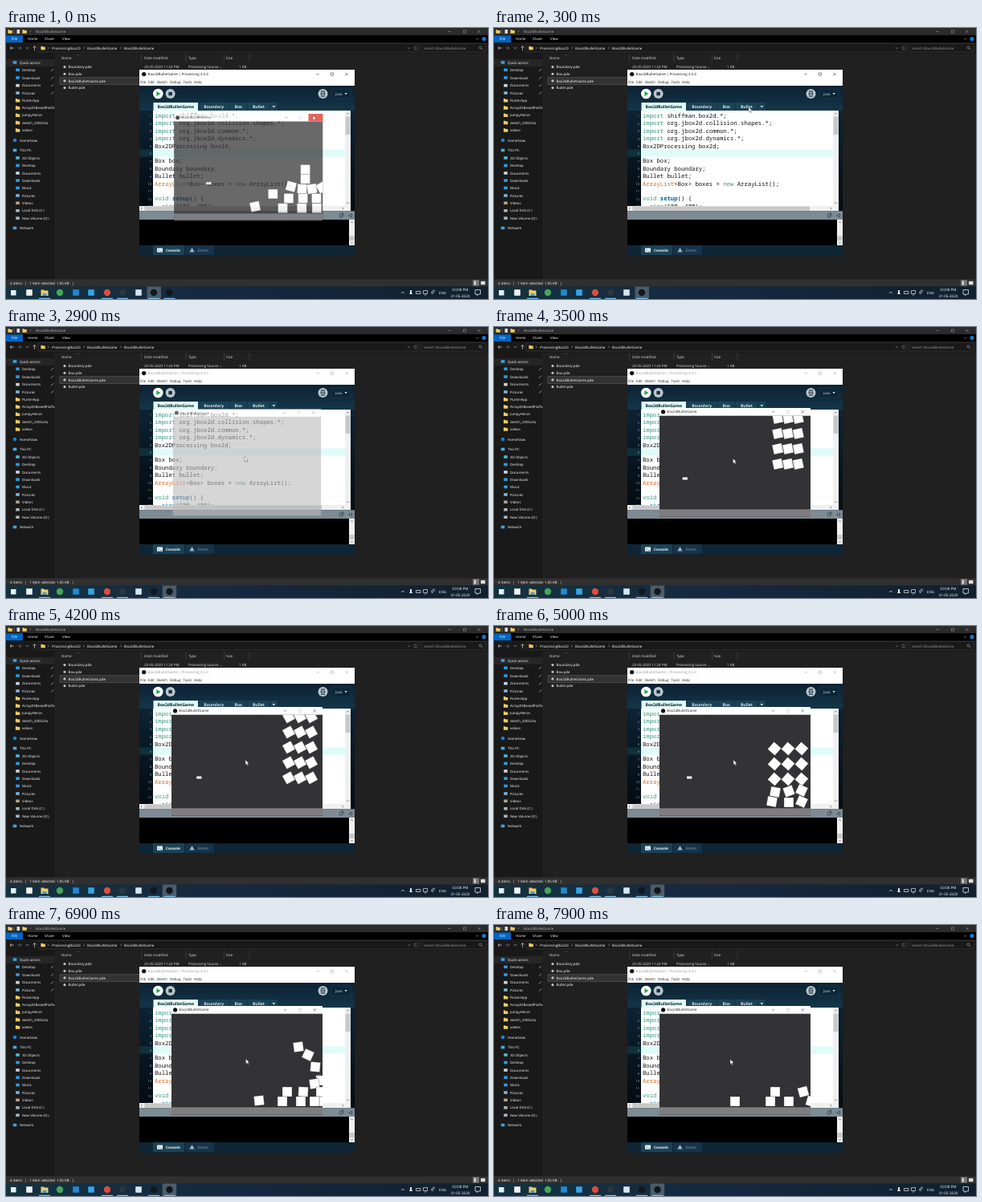
These frames come from a looping animation (600x338 px, 8000 ms). An HTML page:

```html
<!DOCTYPE html>
<html lang="en">
<head>
<meta charset="utf-8">
<title>Box2dBulletGame</title>
<style>
  html, body { margin: 0; width: 100%; height: 100%; overflow: hidden; background: #000; }
  svg { display: block; width: 600px; height: 338px; }
  text { font-family: "Open Sans", "Noto Sans", sans-serif; white-space: pre; text-rendering: geometricPrecision; }
  .code { font-family: "Noto Sans Mono", "DejaVu Sans Mono", monospace; }
</style>
</head>
<body>
<svg id="stage" viewBox="0 0 600 338"></svg>
<script>
const stage = document.getElementById('stage');

// Markup helpers; text is placed by its vertical middle.
const rect = (x, y, w, h, fill, more = '') => `<rect x="${x}" y="${y}" width="${w}" height="${h}" fill="${fill}" ${more}/>`;
const disc = (x, y, r, fill, more = '') => `<circle cx="${x}" cy="${y}" r="${r}" fill="${fill}" ${more}/>`;
const shape = (d, fill, more = '') => `<path d="${d}" fill="${fill}" ${more}/>`;
const line = (d, color, width = .5) => shape(d, 'none', `stroke="${color}" stroke-width="${width}"`);
const text = (x, y, str, fill = '#fff', size = 4.45, more = '') =>
  `<text x="${x}" y="${y + size * .36}" fill="${fill}" font-size="${size}" ${more}>${str}</text>`;
const folder = (x, y) => shape(`M${x - 2.6} ${y - 2.2}h2l.8 .8h2.6v3.6h-5.4z`, '#f3cb62');
const controls = (xs, y, color, faint = color) =>
  line(`M${xs[0] - 1.8} ${y}h3.6`, color) +
  line(`M${xs[1] - 1.6} ${y - 1.6}h3.2v3.2h-3.2z`, faint) +
  line(`M${xs[2] - 1.7} ${y - 1.7}l3.4 3.4m0 -3.4l-3.4 3.4`, color);

function explorer() {
  let out = rect(0, 0, 600, 338, '#202020') + rect(0, 0, 600, 9, '#2b2b2b') + rect(0, 9, 600, 9, '#000') +
    rect(0, 18, 600, 14, '#191919') + rect(0, 32, 61, 281, '#191919') + rect(0, 9.3, 21, 8.7, '#0066c4') +
    rect(0, 39, 60, 9, '#262626') +
    folder(5, 4.5) + rect(13.5, 2, 3.6, 5, '#ddd') + folder(23, 4.5) + line('M10 2v5M29.5 4h2', '#aaa') +
    text(37, 4.5, 'Box2dBulletGame', '#b4b4b4') + controls([552, 571, 589], 4.5, '#aaa') +
    disc(595, 13.5, 2.6, '#1a78c8') + line('M585 12.8l1.6 1.6 1.6-1.6', '#ccc') +
    text(10.5, 13.5, 'File', '#fff', 4.5, 'text-anchor="middle"') +
    text(27, 13.5, 'Home') + text(48, 13.5, 'Share') + text(70, 13.5, 'View');

  out += rect(40, 19.5, 474, 10.5, '#191919', 'stroke="#444" stroke-width=".5"') +
    rect(517, 19.5, 80, 10.5, '#191919', 'stroke="#444" stroke-width=".5"') +
    line('M10 25h-5m2-2l-2 2 2 2M25 24.2l1.5 1.5 1.5-1.5M35.5 28v-5.5m-2 2l2-2 2 2', '#eee', .6) +
    line('M14 25h5m-2-2l2 2-2 2', '#888', .6) + folder(46, 25) +
    ['ProcessingBox2D', 'Box2dBulletGame', 'Box2dBulletGame'].map((name, i) =>
      text([57, 101, 147][i], 25, name) + line(`M${[52, 96.5, 142.5][i]} 23.6l1.4 1.4-1.4 1.4`, '#bbb')).join('') +
    line('M500 24.2l1.5 1.5 1.5-1.5M511.5 23.8a1.9 1.9 0 1 0 .3 1.8', '#bbb') +
    text(520, 25, 'Search Box2dBulletGame', '#9a9a9a') +
    line('M592 24.3a1.5 1.5 0 1 0-3 0 1.5 1.5 0 1 0 3 0m-.5 1l2 2', '#bbb');

  const places = [
    [43, 'Quick access', '#35a0e8'], [52.3, 'Desktop', '#2f9be0'], [62, 'Downloads', '#2f9be0'],
    [71.7, 'Documents', '#cdd3d8'], [81, 'Pictures', '#7fb4d8'], [90.3, 'FlutterApp'], [99.5, 'Array2DBasedPlatfo'],
    [108.8, 'JumpyHeron'], [118, 'sketch_200523a'], [127.5, 'videos'], [140, 'HomeStow', '#1687d9'],
    [152.5, 'This PC', '#4aa8e0'], [162, '3D Objects', '#4fb8d8'], [171.5, 'Desktop', '#2f9be0'],
    [181, 'Documents', '#cdd3d8'], [190.2, 'Downloads', '#2f9be0'], [199.5, 'Music', '#2f9be0'],
    [209, 'Pictures', '#7fb4d8'], [218.3, 'Videos', '#b8a58a'], [227.8, 'Local Disk (C:)', '#a8b4bc'],
    [237.2, 'New Volume (D:)', '#a8b4bc'], [249.5, 'Network', '#3f9fe0']];
  places.forEach(([y, name, color], i) => {
    const root = [0, 10, 11, 21].includes(i), x = root ? 11 : 14.5;
    out += color ? (i == 10 ? disc(x, y, 2.2, color) : rect(x - 2.3, y - 1.8, 4.6, 3.6, color)) : folder(x, y);
    out += text(root ? 17 : 20, y, name, '#fff', 4.35);
    if (i > 0 && i < 5) out += line(`M56 ${y + 1.6}l3-3`, '#bbb', .8);
  });

  out += line('M61.3 32V313', '#2c2c2c') + line('M168.5 32v10M224 32v10M271.5 32v10M303 32v10', '#555') +
    line('M88 34l1.5-1 1.5 1', '#888', .4) + rect(67, 61.8, 240, 8.6, '#333', 'stroke="#666" stroke-width=".5"') +
    text(69, 37, 'Name', '#ddd') + text(172, 37, 'Date modified', '#ddd') +
    text(227, 37, 'Type', '#ddd') + text(274, 37, 'Size', '#ddd') +
    ['Boundary.pde', 'Box.pde', 'Box2dBulletGame.pde', 'Bullet.pde'].map((name, i) => {
      const y = 48.6 + i * 8.65;
      return disc(73, y, 1.6, '#b9c2c8') + text(77.5, y, name);
    }).join('') +
    text(172, 48.6, '25-05-2020 11:24 PM', '#ddd') + text(227, 48.6, 'Processing Source ...', '#ddd') +
    text(290, 48.6, '1 KB', '#ddd') + rect(0, 313.5, 600, 9, '#303030') +
    text(5, 318, '4 items   |   1 item selected  1.05 KB   |') +
    rect(581, 314.3, 8, 7.4, '#777') + rect(583, 315.5, 1.5, 5, '#fff') + rect(591, 315.8, 5.5, 4.4, '#ddd');
  return out;
}

function taskbar() {
  const icons = [
    [29, '#f0f0f0', 0], [67, '#46a758', 1], [87, '#2189d1', 0], [106, '#35a4e6', 0], [126, '#dd4b3e', 1],
    [145, '#2b3740', 1], [165, '#d5e6f0', 0], [184, '#11181d', 1]];
  return rect(0, 322.5, 600, 15.5, 'url(#dock)') +
    rect(0, 322.5, 17.5, 15.5, '#4a5c69', 'id="active"') + rect(6, 327, 6.5, 6.5, '#e4f1f9') +
    icons.map(([x, color, round]) => round ? disc(x, 330, 4.2, color) : rect(x - 3.8, 326.2, 7.6, 7.6, color)).join('') +
    shape('M43.5 326.5h3.5l1 1h4.5v6.5h-9z', '#f5cb60') + rect(45.5, 331, 5, 3, '#3d9be0') +
    [41, 119, 138, 177].map(x => rect(x, 336.8, 14, 1.2, '#7cbfe8')).join('') +
    `<g id="sketchIcon">${disc(203.5, 330, 4.2, '#10161b') + rect(196.5, 336.8, 14, 1.2, '#7cbfe8')}</g>` +
    line('M492 331l2-2 2 2M510.5 328.5h5.5v3h-5.5zM519.5 327.5h5v4h-5zm1.5 5.5h2M530 331.5a3 3 0 0 1 4-4m-2.5 4.5a1.5 1.5 0 0 1 2.2-2.4', '#e6e6e6', .7) +
    shape('M503 327h2v3l1 2h-4l1-2z', '#e6e6e6') + text(539, 330, 'ENG', '#fff', 4.4) +
    text(565.5, 326.6, '03:08 PM', '#fff', 4.6, 'text-anchor="middle"') +
    text(565.5, 334.3, '31-05-2020', '#fff', 4.6, 'text-anchor="middle"') +
    shape('M584 326.5h6.5v5.5h-2.5l-1.5 1.7v-1.7h-2.5z', 'none', 'stroke="#fff" stroke-width=".7"');
}

function editor() {
  const key = word => `<tspan fill="#33997e">${word}</tspan>`;
  const call = (word, more = '') => `<tspan fill="#006699" ${more}>${word}</tspan>`;
  const code = [
    ...['shiffman.box2d', 'org.jbox2d.collision.shapes', 'org.jbox2d.common', 'org.jbox2d.dynamics'].map(p => `${key('import')} ${p}.*;`),
    'Box2DProcessing box2d;', '', 'Box box;', 'Boundary boundary;', 'Bullet bullet;',
    `<tspan fill="#e2661a">ArrayList</tspan>&lt;Box&gt; boxes = ${key('new')} ArrayList();`, '',
    `${key('void')} ${call('setup', 'font-weight="bold"')}() {`, `  ${call('size')}(600, 400);`];
  const tab = (x, w, name, on) => rect(x, 93, w, 10.2, on ? '#dffcf8' : '#1b4256') +
    text(x + w / 2, 98, name, on ? '#0a1b26' : '#d5e3e8', 5.1, 'font-weight="bold" text-anchor="middle"');

  return rect(166, 52, 268, 20, '#fff') + disc(171.7, 57.6, 2.7, '#10181e') +
    `<g id="mainTitle">${text(176.5, 57.6, 'Box2dBulletGame | Processing 3.5.4', 'currentColor') + controls([388, 406, 424], 57.6, 'currentColor')}</g>` +
    ['File', 'Edit', 'Sketch', 'Debug', 'Tools', 'Help'].map((m, i) => text([167, 177, 187.5, 204, 220.5, 234][i], 67.5, m, '#222')).join('') +
    rect(166, 72, 268, 212, '#0e2536') + rect(166, 72, 268, 31, 'url(#bar)') + rect(166, 103, 268, 125, 'url(#gutter)') +
    disc(189.3, 82, 6.3, '#fff') + shape('M187.4 78.9l5 3.1-5 3.1z', '#20a84a') +
    disc(204.6, 82, 6, '#b9c6cb') + rect(202.4, 79.8, 4.4, 4.4, '#1a3040') +
    disc(394.5, 82, 6, '#b9c6cb') + line('M392 79h5M391 82h7M392 85h5M393 78v8M396 78v8', '#1a3040', .8) +
    rect(405, 76, 24, 12, '#0d2638', 'stroke="#1d4257" stroke-width=".5"') + text(410, 82, 'Java', '#dbe6ea') +
    shape('M421.5 81h3.2l-1.6 2.2z', '#dbe6ea') +
    tab(183.5, 55.5, 'Box2dBulletGame', true) + tab(240, 37.5, 'Boundary') + tab(278.5, 21.5, 'Box') + tab(301, 27, 'Bullet') +
    tab(329, 8.5, '') + shape('M331.5 97h3.6l-1.8 2.6z', '#d5e3e8') +
    rect(183, 103, 239, 119, '#fff') + rect(183, 151.3, 239, 9.4, '#dffcf8') + rect(166, 151.3, 17, 9.4, '#10303c') +
    code.map((src, i) => {
      const y = 109.4 + i * 9.4;
      return text(181, y + .5, i + 1, '#9fb2bc', 4, 'text-anchor="end"') + text(185, y, src, '#111', 7.27, 'class="code"');
    }).join('') +
    rect(422, 103, 7, 119, '#f0f0f0') + rect(422.5, 110.5, 6, 22.5, '#c8c8c8') +
    line('M424 107.5l1.5-1.5 1.5 1.5M424 217.5l1.5 1.5 1.5-1.5', '#555', .7) +
    rect(166, 222, 263, 6.3, '#f0f0f0') + rect(172.5, 222.5, 220.5, 5.3, '#c8c8c8') +
    line('M169.5 223.7l-1.4 1.4 1.4 1.4M418.5 223.7l1.4 1.4-1.4 1.4', '#555', .7) +
    rect(166, 228.3, 268, 10.7, '#7d8b94') + line('M415.5 232h3v4h-3zm1.5-1h3v4', '#24343f', .6) +
    line('M430.5 232l-4 2 4 2z', '#24343f', .6) +
    rect(166, 239, 268, 32, '#000') + rect(427, 239, 7, 32, '#f0f0f0') + rect(427.5, 259, 6, 6, '#c8c8c8') +
    line('M429 243l1.5-1.5 1.5 1.5M429 267l1.5 1.5 1.5-1.5', '#555', .7) +
    rect(183, 271, 39, 12, '#1b4256') + rect(223, 271, 36, 12, '#15334a') +
    rect(188, 274.5, 7, 5.2, '#e9f2f4') + line('M189.5 276l1.4 1.2-1.4 1.2m2.5 0h1.8', '#17303f') +
    text(199, 277.2, 'Console', '#f2f7f8', 4.6, 'font-weight="bold"') +
    shape('M231.5 274l3.2 5.6h-6.4z', '#9fb2bc') + text(239, 277.2, 'Errors', '#9fb2bc', 4.6);
}

function game() {
  return rect(206, 101, 188, 135.5, '#ccc', 'id="canvas"') + rect(206, 101, 188, 9.7, '#fff') +
    rect(376, 101, 18, 9.7, '#e02a20', 'id="closeHover"') +
    disc(210.6, 105.8, 2.6, '#0c0c0c') + text(215.3, 105.8, 'Box2dBulletGame', '#222') +
    controls([347.7, 366, 384.3], 105.8, '#333', '#bbb') +
    `<g id="scene" clip-path="url(#view)">${rect(206, 227, 188, 9.5, '#807d80') + line('M206 227h188', '#222')}
      ${rect(-3.1, -1.5, 6.2, 3, '#fff', 'id="bullet"')}
      ${rect(-6, -6, 12, 12, '#fff', 'class="box" stroke="#333" stroke-width=".3"').repeat(15)}</g>`;
}

const fade = (id, dir, ...colors) => `<linearGradient id="${id}" ${dir}>` +
  colors.map((c, i) => `<stop offset="${i / (colors.length - 1)}" stop-color="${c}"/>`).join('') + '</linearGradient>';

stage.innerHTML = '<defs>' + fade('bar', 'x2="0" y2="1"', '#0c2132', '#14364a') +
  fade('gutter', 'x2="0" y2="1"', '#0c2334', '#040a10') + fade('dock', '', '#143240', '#16283f', '#10202e') +
  `<clipPath id="view">${rect(206, 110.7, 188, 125.8, '#000')}</clipPath></defs>` +
  explorer() + taskbar() + editor() + `<g id="game">${game()}</g>` +
  shape('M0 0v6.2l1.5-1.4 1.1 2.4 1-.5-1-2.3h2z', '#fff', 'id="cursor" stroke="#222" stroke-width=".35"');

const $ = id => document.getElementById(id);
const boxes = [...document.querySelectorAll('.box')];
const set = (node, name, value) => node.setAttribute(name, value);
const show = (node, on) => set(node, 'visibility', on ? 'inherit' : 'hidden');
const mix = (a, b, u) => a + (b - a) * u;

// Pile left over from the previous round: x, y, angle.
const oldPile = [
  [372, 171.5, 0], [372, 183.5, 0], [354, 193, 15], [368, 196, 3], [380.5, 196, -8], [393, 194, -30], [331, 202.5, 0],
  [351, 208, 0], [369, 208, 0], [386, 208, 0], [308.5, 218.5, -12], [343.5, 220.5, 0], [367.5, 220.5, 0], [386.5, 220.5, 0]];

// Poses row by row from the top: touching down, after the hit, and those still in view at the end.
const landing = [[350, 207, -80], [367, 206, -20], [383, 205, -65], [346, 219, -80], [367, 220, -90], [383, 219, -65]];
const struck = [
  [364, 152, -8], [393, 194, 0], [420, 190, 60], [376, 162, 25], [385, 177, 5], [425, 205, 40],
  [315, 219, -6], [384, 198, -8], [396, 220, 0], [350, 208, 0], [370, 208, 3], [392, 208, 0],
  [344, 220, 0], [367, 220, 0], [384, 220, 0]];
const final = { 6: [300, 220, 0], 9: [350, 208, 0], 10: [385, 208, -15], 12: [344, 220, 0], 13: [367, 220, 0], 14: [395, 220, 15] };

const START = 3000, SETTLED = 5500, HIT = 6000;

function falling(i, ms) {
  const s = (ms - START) / 1000, row = i / 3 | 0;
  return [366 + (i % 3 - 1) * (12.5 + 1.1 * s * s), 91 + 19 * row + 15.5 * s * s, -24 * s];
}

function boxPose(i, ms) {
  const row = i / 3 | 0, rest = [[345, 367, 384][i % 3], 172 + 12 * row];
  const release = [5200, 5150, 5050, 4900, 4800][row];
  if (ms <= release) return falling(i, ms);
  const [x, y, a] = struck[i];
  const keys = [[release, ...falling(i, release)]];
  if (row > 2) keys.push([5000, ...landing[i - 9]]);
  // A quarter turn looks the same, so the angle starts over once the pile rests.
  keys.push([SETTLED, ...rest, -90], [SETTLED, ...rest, 0], [HIT, ...rest, 0], [6900, x, y, a],
    [7900, ...(final[i] || [x + 48, y + 60, a + 70])]);
  let k = 0;
  while (k < keys.length - 2 && ms >= keys[k + 1][0]) k++;
  const from = keys[k], to = keys[k + 1], span = (to[0] - from[0]) / 1000;
  const u = (ms - from[0]) / (to[0] - from[0]);
  const pose = [1, 2, 3].map(c => mix(from[c], to[c], u));
  if (row < 3 && ms > HIT && !final[i]) pose[1] -= 15.5 * span * span * u * (1 - u);
  return pose;
}

function bulletX(ms) {
  if (ms < START) return 250;
  if (ms < SETTLED) return 236 + 3.6 * (ms - START) / 1000;
  return ms < HIT ? mix(245, 338, (ms - SETTLED) / 500) : mix(338, 389, (ms - HIT) / 900);
}

const path = [[0, 382, 109], [900, 186.5, 78], [2300, 186.5, 78], [2900, 297, 161.5], [4200, 298, 167], [5000, 298, 167], [6900, 298.5, 167], [7900, 294, 167.5]];
function cursorAt(ms) {
  const k = Math.max(1, path.findIndex(p => p[0] >= ms)), [a, b] = [path[k - 1], path[k]];
  const u = (ms - a[0]) / (b[0] - a[0]);
  return [mix(a[1], b[1], u), mix(a[2], b[2], u)];
}

function recorded(now) {
  const ms = Math.floor(now % 8000 / 100) * 100;
  for (const [from, to] of [[2100, 2200], [2500, 2700], [5200, 5400]]) if (ms > from && ms <= to) return from;
  return ms;
}

function draw(now) {
  const ms = recorded(now), closing = ms < 200, open = ms > 2800, live = closing || ms >= START;
  const grow = Math.min(1, (ms - 2800) / 200);
  const scale = closing ? .985 - ms / 5000 : .96 + .04 * grow;
  show($('game'), closing || open);
  set($('game'), 'opacity', closing ? .73 * (1 - ms / 200) : Math.max(0, Math.min(1, 1.2 * grow)));
  set($('game'), 'transform', `translate(${closing ? '301.7 173.5' : '300 168.5'}) scale(${scale}) translate(-300 -168.5)`);
  set($('canvas'), 'fill', live ? '#333234' : '#bbb');
  show($('scene'), live);
  show($('closeHover'), closing);
  show($('sketchIcon'), closing || open);
  set($('active'), 'x', open ? 194.7 : 175.5);
  set($('mainTitle'), 'color', open ? '#999' : '#111');
  set($('bullet'), 'transform', `translate(${bulletX(ms)} 189)`);
  boxes.forEach((box, i) => {
    const pose = closing ? oldPile[i] : boxPose(i, ms);
    show(box, pose);
    if (pose) set(box, 'transform', `translate(${pose[0]} ${pose[1]}) rotate(${pose[2]})`);
  });
  set($('cursor'), 'transform', `translate(${cursorAt(ms)})`);
}

const begin = performance.now();
function tick() {
  draw(performance.now() - begin);
  requestAnimationFrame(tick);
}
tick();
</script>
</body>
</html>
```
